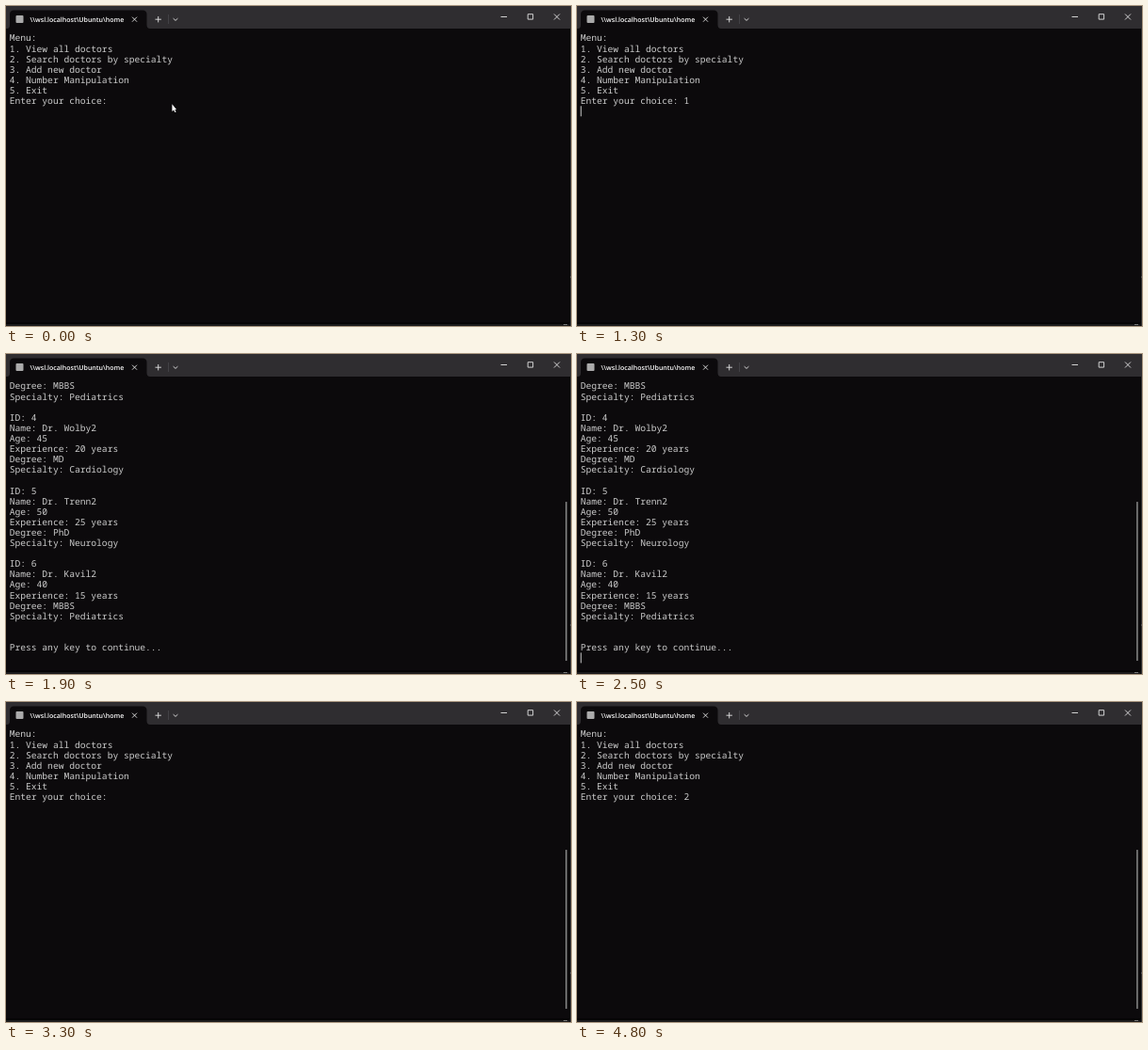
Animation, 600 px wide and 340 px high, one loop 5000 ms. Source, as an HTML page:

```html
<!DOCTYPE html>
<html lang="en">
<head>
<meta charset="utf-8">
<title>Terminal menu</title>
<style>
  html, body { margin: 0; width: 100%; height: 100%; overflow: hidden; background: #0c0a0c; }
  svg { display: block; }
  text { text-rendering: geometricPrecision; white-space: pre; }
  .tab-title { font: 600 7px "Open Sans", "Noto Sans", sans-serif; fill: #fff; }
  #screen { font: 500 9.65px "Noto Sans Mono", "DejaVu Sans Mono", monospace; fill: #ccc; }
  .icon { fill: none; stroke: #e4e4e4; stroke-width: .9; }
</style>
</head>
<body>
<svg width="600" height="340" viewBox="0 0 600 340">
  <rect width="600" height="340" fill="#0c0a0c"/>
  <rect width="600" height="24" fill="#2f2d30"/>
  <path d="M1 24Q4 24 4 20V9Q4 4.5 8.500 4.500H145Q149.500 4.500 149.500 9V20Q149.500 24 153 24Z" fill="#0c0a0c"/>
  <rect x="10.500" y="10" width="8" height="8" rx="1" fill="#aaa"/>
  <text class="tab-title" x="25.600" y="16.700">\\wsl.localhost\Ubuntu\home</text>
  <g class="icon">
    <path d="M134 11.700l5 5m0 -5l-5 5M158.500 14.200h6.400m-3.200 -3.200v6.400M177.600 13.200l2.400 2.200l2.400 -2.200"/>
    <path d="M525.500 11.500h6.500M554.200 8.700h5.400v5.400h-5.400zM582 8.500l6 6m0 -6l-6 6"/>
    <path d="M172.500 9v10" stroke="#464448"/>
  </g>
  <path d="M598.500 24V337" stroke="#050505"/>
  <path d="M599.500 0V340" stroke="#302f31"/>
  <path d="M0 337H598" stroke="#000"/>
  <path d="M0 339H598" stroke="#1c1b1c" stroke-width="2"/>
  <path d="M599 288h1M592 338.500h4" stroke="#777"/>
  <g id="screen"></g>
  <rect id="scrollbar" x="594.300" y="157" width="1.300" height="169" rx=".6" fill="#9d9d9d"/>
  <rect id="caret" width="1" height="11" fill="#ccc"/>
  <path id="pointer" d="M176.400 104.200V112l1.800 -1.600l1.200 2.700l1.200 -.5l-1.200 -2.600H181Z" fill="#fff"/>
</svg>
<script>
const LOOP = 5000, LEFT = 3.7, TOP = 28.5, ROW = 11.11, COLUMN = 5.79;
const [screenBox, scrollbar, caret, pointer] =
  ["screen", "scrollbar", "caret", "pointer"].map(id => document.getElementById(id));

const menu = choice => [
  "Menu:",
  "1. View all doctors",
  "2. Search doctors by specialty",
  "3. Add new doctor",
  "4. Number Manipulation",
  "5. Exit",
  "Enter your choice: " + choice
];

const doctor = (id, name, age, years, degree, specialty) => [
  `ID: ${id}`, `Name: Dr. ${name}`, `Age: ${age}`, `Experience: ${years} years`,
  `Degree: ${degree}`, `Specialty: ${specialty}`, ""
];

const listing = [
  "Degree: MBBS", "Specialty: Pediatrics", "",
  ...doctor(4, "Wolby2", 45, 20, "MD", "Cardiology"),
  ...doctor(5, "Trenn2", 50, 25, "PhD", "Neurology"),
  ...doctor(6, "Kavil2", 40, 15, "MBBS", "Pediatrics"),
  "", "Press any key to continue...", ""
];

// Each scene starts at a time; the caret sits at the end of the last line.
const scenes = [
  [0, menu("")],
  [500, menu("1")],
  [1300, [...menu("1"), ""]],
  [1400, listing],
  [2700, menu("")],
  [4200, menu("2")]
];
const caretHidden = [[0, 100], [1100, 1300], [1900, 2500], [3300, 3800], [4800, LOOP]];

const show = (element, visible) =>
  element.setAttribute("visibility", visible ? "visible" : "hidden");

function writeLines(lines) {
  screenBox.replaceChildren(...lines.map((line, row) => {
    const text = document.createElementNS(screenBox.namespaceURI, "text");
    text.setAttribute("x", LEFT);
    text.setAttribute("y", TOP + row * ROW + 8.9);
    text.textContent = line;
    return text;
  }));
  const last = lines.length - 1;
  caret.setAttribute("x", LEFT + lines[last].length * COLUMN);
  caret.setAttribute("y", TOP + last * ROW);
}

let current;
function draw(now) {
  const time = now % LOOP;
  const scene = scenes.findLast(([start]) => time >= start);
  if (scene !== current) writeLines((current = scene)[1]);
  show(caret, !caretHidden.some(([from, to]) => time >= from && time < to));
  show(pointer, time < 500);
  show(scrollbar, time >= 1400);
}

const begin = performance.now();
function tick() {
  draw(performance.now() - begin);
  requestAnimationFrame(tick);
}
tick();
</script>
</body>
</html>
```
